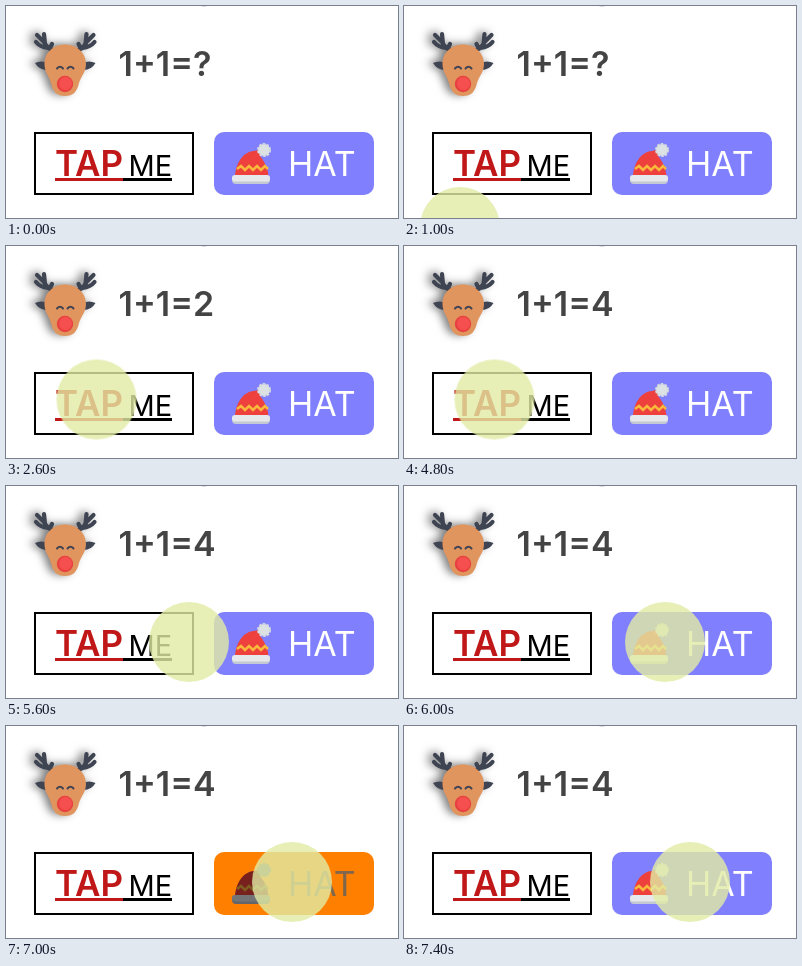
These frames come from a looping animation (392x212 px, 8 s). An HTML page:

```html
<!DOCTYPE html>
<html lang="en">
<head>
<meta charset="utf-8">
<title>Tap demo</title>
<style>
  html, body { margin: 0; width: 100%; height: 100%; overflow: hidden; background: #fff; }
  svg { display: block; width: 392px; height: 212px; }
  text { font-family: Inter, "Liberation Sans", sans-serif; }
  .sum text { font-size: 34px; font-weight: 600; fill: #444; }
  .deer { filter: drop-shadow(-5px -1px 4px rgba(0, 0, 0, .5)); }

  .sum text, .touch, .btn, .label, .hat { animation: 8s step-end infinite; }
  .sum .q { animation-name: q; }
  .sum .two { animation-name: two; }
  .sum .three { animation-name: three; }
  .sum .four { animation-name: four; }
  .touch { fill: rgba(226, 236, 164, .8); animation-name: touch; }
  .btn { fill: #8080ff; animation-name: btn; }
  .label { font-size: 34px; fill: #fff; animation-name: label; }
  .hat { animation-name: hat; }

  @keyframes q { 0% { visibility: visible } 32.5%, 100% { visibility: hidden } }
  @keyframes two { 0% { visibility: hidden } 32.5% { visibility: visible } 47.5%, 100% { visibility: hidden } }
  @keyframes three { 0% { visibility: hidden } 47.5% { visibility: visible } 60%, 100% { visibility: hidden } }
  @keyframes four { 0% { visibility: hidden } 60%, 100% { visibility: visible } }

  @keyframes btn { 87.5% { fill: #ff8000 } 92.5% { fill: #8080ff } }
  @keyframes label { 87.5% { fill: #80664c } 92.5% { fill: #fff } }
  @keyframes hat { 0% { filter: none } 87.5% { filter: brightness(.5) } 92.5%, 100% { filter: none } }

  /* finger rises to the first button, then slides across to the second */
  @keyframes touch {
    0% { transform: translate(51px, 260px) }
    7.5% { transform: translate(51px, 233px) }
    10% { transform: translate(55px, 224px) }
    12.5% { transform: translate(56px, 221px) }
    15% { transform: translate(72px, 192px) }
    17.5% { transform: translate(83px, 166px) }
    20% { transform: translate(89px, 155px) }
    22.5% { transform: translate(90.5px, 153.5px) }
    70% { transform: translate(183px, 156px) }
    72.5% { transform: translate(224px, 156px) }
    75% { transform: translate(261px, 156px) }
    77.5% { transform: translate(285px, 156px) }
    80%, 100% { transform: translate(286px, 156px) }
  }
</style>
</head>
<body>
<svg viewBox="0 0 392 212">
  <defs>
    <g id="side">
      <path d="M49 45C43 44 40 40 38 36L31 29M39 38L38 28M30 36Q34 41 42 42M44 42L46 38"
        fill="none" stroke="#3f4453" stroke-width="4.200" stroke-linecap="round"/>
      <path d="M29 57Q35 54 42 57L41 64Q33 64 29 57Z" fill="#3f4453"/>
    </g>
  </defs>

  <ellipse cx="198" cy="0" rx="3" ry="1" fill="#ddd"/>

  <g class="deer">
    <use href="#side"/>
    <use href="#side" transform="matrix(-1 0 0 1 118.5 0)"/>
    <path d="M59 38.500C71 38.500 80 47 80 58C80 66 75 70 73 77C71 86 67 90 59 90C51 90 47 86 45 77C43 70 38.500 66 38.500 58C38.500 47 47 38.500 59 38.500Z" fill="#e0945e"/>
    <path d="M51 62.500Q54 59 57 62.500M61.500 62.500Q64.500 59 67.500 62.500" fill="none" stroke="#3f4453" stroke-width="2" stroke-linecap="round"/>
    <circle cx="59" cy="78" r="8.200" fill="#e8403f"/>
    <circle cx="59.500" cy="77.500" r="6.500" fill="#f5504f"/>
  </g>

  <g class="sum">
    <text class="q" x="112.500" y="69.500">1+1=?</text>
    <text class="two" x="112.500" y="69.500">1+1=2</text>
    <text class="three" x="112.500" y="69.500">1+1=3</text>
    <text class="four" x="112.500" y="69.500">1+1=4</text>
  </g>

  <rect x="29" y="127" width="158" height="61" fill="#fff" stroke="#000" stroke-width="2"/>
  <text x="49" y="169.500" font-size="35" font-weight="600" fill="#c01818">TAP</text>
  <text x="122.500" y="169.500" font-size="29">ME</text>
  <path d="M49 173.500H117" stroke="#c01818" stroke-width="3"/>
  <path d="M117 173.500H166" stroke="#000" stroke-width="3"/>

  <rect class="btn" x="208" y="126" width="160" height="63" rx="10"/>
  <g class="hat">
    <path d="M229 170C230 158 236 146 248 145Q254 143 259 147L254 150C259 156 262 163 262.500 170Z" fill="#ee403c"/>
    <path d="M231 163L235 160L239 164L243 160L247 164L251 160L255 164L259 160L262 163" fill="none" stroke="#f9b83c" stroke-width="2.500"/>
    <rect x="226" y="169" width="38" height="9" rx="4" fill="#c3c9d2"/>
    <rect x="226" y="169" width="38" height="6.500" rx="3.200" fill="#e6e8ec"/>
    <circle cx="258" cy="144" r="6" fill="#dce1e4" stroke="#d3d9dd" stroke-width="2" stroke-dasharray="2.500 1.270"/>
  </g>
  <text class="label" x="282" y="169.500">HAT</text>

  <circle class="touch" r="40"/>
</svg>
</body>
</html>
```
